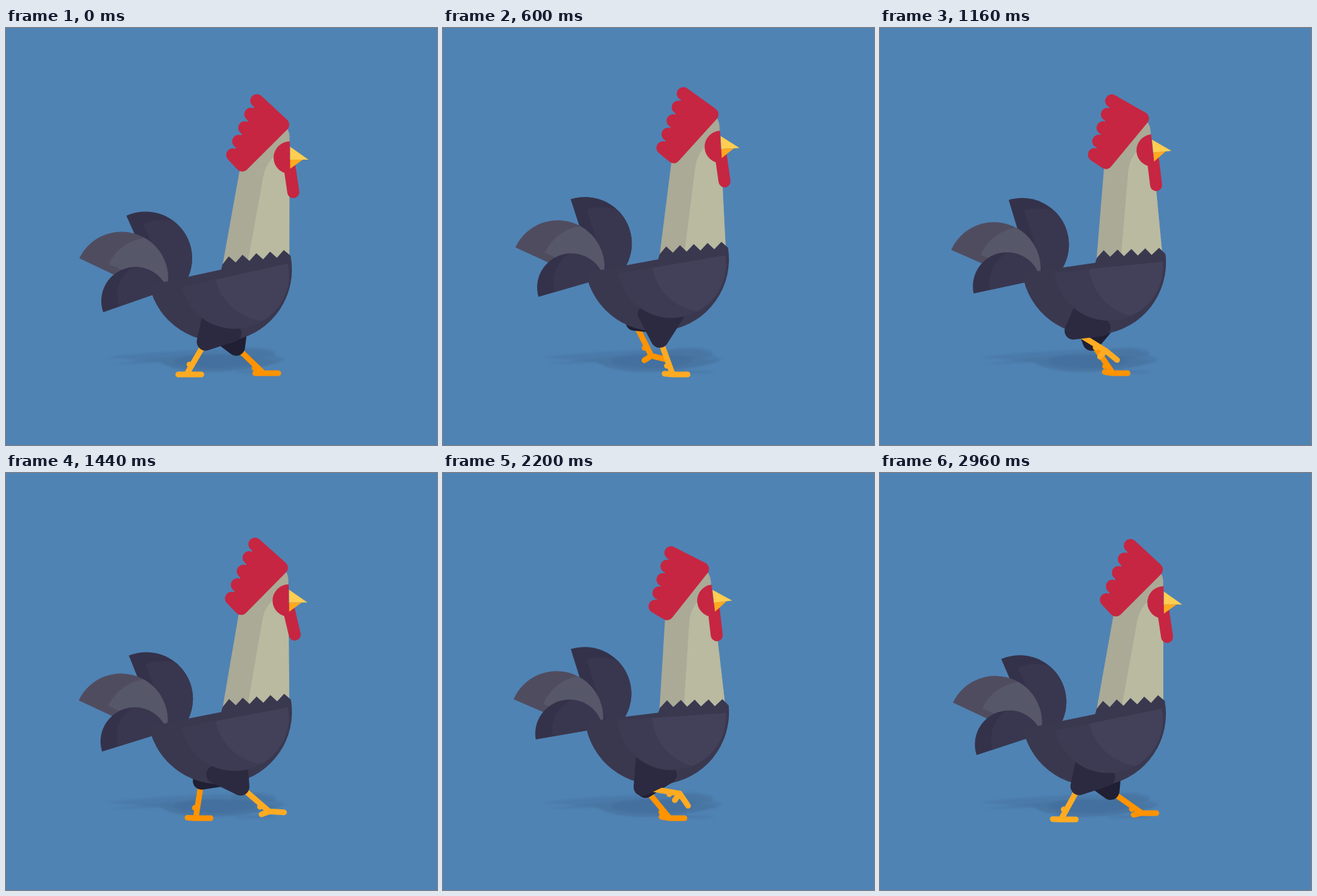
Animation, 683 px wide and 662 px high, one loop 3000 ms. Source, as an HTML page:

```html
<!DOCTYPE html>
<html lang="en">
<head>
<meta charset="utf-8">
<title>Walking rooster</title>
<style>
  html, body { margin: 0; width: 100%; height: 100%; overflow: hidden; background: #4f83b4; }
  svg { display: block; width: 100vw; height: 100vh; }
  .limb { fill: none; stroke-width: 9; stroke-linecap: round; stroke-linejoin: round; }
  .thigh { stroke-width: 28; stroke-linejoin: round; }
  .comb { fill: none; stroke: #c62641; stroke-width: 21; stroke-linecap: round; }
</style>
</head>
<body>
<svg viewBox="0 0 683 662" preserveAspectRatio="xMidYMid slice">
  <defs>
    <filter id="soft" x="-20%" y="-60%" width="140%" height="220%"><feGaussianBlur stdDeviation="1.8"/></filter>
    <clipPath id="bowlClip"><path d="M-86 0A86 85 0 0 0 86 0Z"/></clipPath>
  </defs>
  <rect width="683" height="662" fill="#4f83b4"/>
  <g fill="#3f6791" fill-opacity=".26" filter="url(#soft)">
    <path d="M158 523Q200 517 270 513T400 510Q425 516 443 527Q400 542 340 545T240 530Z"/>
    <path d="M166 534Q200 528 280 520T436 530Q390 544 330 546T245 531Z"/>
    <ellipse cx="330" cy="529" rx="65" ry="11"/>
    <ellipse cx="392" cy="516" rx="36" ry="9"/>
    <ellipse cx="395" cy="546" rx="34" ry="2.5"/>
  </g>
  <g id="farLeg">
    <path class="limb" stroke="#ff9300"/>
    <path class="thigh" fill="#201f33" stroke="#201f33" d="M46 0L7 22.5V-22.5Z"/>
  </g>
  <g id="tail"></g>
  <g id="head">
    <path fill="#aaaa97" d="M341 388L371 220 438 150Q449 160 449 172V392Z"/>
    <path fill="#b9baa0" d="M380 388L407 238Q411 212 430 200L449 190V392Z"/>
    <path id="combFill" fill="#c62641"/>
    <path id="combLobes" class="comb"/>
    <path fill="#c62641" d="M449.5 179.5A25.5 25.5 0 0 0 449.5 231Z"/>
    <path id="wattle" class="comb" style="stroke-width:19" d="M449 219L455 260"/>
    <path fill="#ffce52" d="M450 188L479 208.5H450Z"/>
    <path fill="#ffa91f" d="M450 208.5H470L450 223Z"/>
  </g>
  <path id="body" fill="#3a384f"/>
  <g id="nearLeg">
    <path class="limb" stroke="#ffab22"/>
    <path class="thigh" fill="#2c2a41" stroke="#2c2a41" d="M46 0L7 22.5V-22.5Z"/>
  </g>
  <g id="bowl">
    <path fill="#3d3b53" d="M-86 0A86 85 0 0 0 86 0Z"/>
    <path fill="#434159" clip-path="url(#bowlClip)" d="M-31 0A86 85 0 0 0 141 0Z"/>
  </g>
</svg>
<script>
const STEP = 500, CYCLE = 2 * STEP, LOOP = 3000, TICK = 40;
const THIGH = 46, SHIN = 60, STRIDE = 122, BACK = 286;
const RAD = Math.PI / 180;
const $ = id => document.getElementById(id);
const wave = (t, period, lead = 0) => Math.cos(2 * Math.PI * (t + lead) / period);
const polar = ([x, y], r, deg) => [x + r * Math.cos(deg * RAD), y + r * Math.sin(deg * RAD)];
const heading = ([x, y], [tx, ty]) => Math.atan2(ty - y, tx - x) / RAD;
const turn = (p, center, deg) =>
  polar(center, Math.hypot(p[0] - center[0], p[1] - center[1]), heading(center, p) + deg);
const pt = p => p.map(v => v.toFixed(2)).join(' ');
const place = (el, value) => el.setAttribute('transform', value);
const range = (n, make) => Array.from({ length: n }, (_, i) => make(i));

// First half of the cycle swings the foot forward, second half drags it back on the ground
function footAt(phase, { ground, drag }) {
  const swinging = phase < STEP, u = phase % STEP / STEP;
  const arc = Math.sin(Math.PI * u);
  if (!swinging) return { ankle: [BACK + STRIDE * (1 - u) ** drag, ground], front: 0, back: 180 + 10 * arc };
  const reach = 48 * arc - 9 * Math.sin(2 * Math.PI * u);
  return {
    ankle: [BACK + STRIDE * u + reach, ground - 46 * arc * (1.1 - .4 * u)],
    front: 65 * arc ** 3,
    back: 180 - 56 * arc
  };
}

// Two-bone solution for the thigh, bending backwards at the knee
function thighAngle(hip, ankle) {
  const d = Math.hypot(ankle[0] - hip[0], ankle[1] - hip[1]);
  const cos = (THIGH ** 2 + d ** 2 - SHIN ** 2) / (2 * THIGH * d);
  return heading(hip, ankle) + Math.acos(Math.min(1, cos)) / RAD;
}

function poseLeg(leg, time, hip) {
  const { ankle, front, back } = footAt((time + leg.offset) % CYCLE, leg);
  const angle = thighAngle(hip, ankle);
  const knee = polar(hip, THIGH, angle), shin = heading(knee, ankle);
  const spur = polar(polar(ankle, -16, shin), 4, shin + 90);
  const [limb, thigh] = leg.el.children;
  limb.setAttribute('d', `M${pt(knee)}L${pt(ankle)}L${pt(polar(ankle, 23.5, front))}` +
    `M${pt(ankle)}L${pt(polar(ankle, 13, back))}M${pt(spur)}h.01`);
  place(thigh, `translate(${pt(hip)}) rotate(${angle})`);
}

const legs = [
  { el: $('farLeg'), offset: STEP, ground: 548, drag: 1 },
  { el: $('nearLeg'), offset: 0, ground: 550, drag: 2 }
];

// Half-disc feathers; the lighter copy is offset by `shift`, and each sways around its `root`
const feathers = [
  { center: [221, 365], r: 74, angle: 66, shift: [23, -19], root: [270, 410], dark: '#34324a', light: '#39374f', sway: (tilt, bob) => -.25 * bob },
  { center: [183, 397], r: 74, angle: 25.5, shift: [46, -12], root: [250, 415], dark: '#504c60', light: '#565769', sway: tilt => -.85 * tilt },
  { center: [205, 433], r: 54, angle: -19.3, shift: [27, 0], root: [256, 415], dark: '#34324a', light: '#39374f', sway: tilt => .45 * tilt }
];
$('tail').innerHTML = feathers.map(({ center, r, angle, shift, dark, light }, i) => {
  const half = `M${-r} 0A${r} ${r} 0 0 1 ${r} 0Z`;
  return `<g><g transform="translate(${center}) rotate(${angle})">
    <clipPath id="feather${i}"><path d="${half}"/></clipPath>
    <path fill="${dark}" d="${half}"/>
    <g clip-path="url(#feather${i})"><path fill="${light}" transform="translate(${shift})" d="${half}"/></g>
  </g></g>`;
}).join('');

const collar = range(9, i => [353 + 10.9 * i, 362 - 1.25 * i + (i % 2) * 11]);
$('body').setAttribute('d',
  `M451 361A114.45 114.45 0 0 1 227 408L341 383 343 375 ${collar.map(pt).join(' ')}Z`);

const lobes = range(5, i => [397 - 9.5 * i, 115 + 21.5 * i]);
const bases = range(5, i => [438 - 16 * i, 153 + 16 * i]);

function poseHead(t, lean, drop) {
  place($('head'), `translate(0 ${drop}) rotate(${lean} 395 385)`);
  const ends = lobes.map((p, i) => turn(p, bases[i], 1.4 * lean));
  $('combLobes').setAttribute('d',
    ends.map((p, i) => `M${pt(p)}L${bases[i]}`).join('') + `M${bases[0]}L${bases[4]}`);
  $('combFill').setAttribute('d', `M${ends.map(pt).join('L')}L${bases[4]}L${bases[0]}Z`);
  const flick = -6.5 * Math.max(0, wave(t, CYCLE, -STEP + 20)) ** 8;
  place($('wattle'), `rotate(${flick - 1.25 * lean} 449 215)`);
}

function render(time) {
  const t = time % CYCLE;
  const tilt = 5.2 * (1 - wave(t, STEP, -10));
  const bob = -9.2 + 8.3 * wave(t, STEP / 2, 16) + 2 * wave(t, STEP);
  const lean = -3.4 + 3.55 * wave(t, STEP, 14);
  const drop = bob + .3 * tilt, roll = .6 * tilt;

  const bodyPose = `translate(0 ${drop}) rotate(${roll} 339 384)`;
  place($('body'), bodyPose);
  place($('tail'), bodyPose);
  feathers.forEach(({ root, sway }, i) =>
    place($('tail').children[i], `rotate(${sway(tilt, bob)} ${root})`));
  place($('bowl'), `translate(362.5 ${392 + bob}) rotate(${tilt - 12.7})`);
  poseHead(t, lean, drop + 56 * Math.sin(roll * RAD));

  const hip = [347 - .55 * tilt, 463.5 + drop];
  legs.forEach(leg => poseLeg(leg, t, hip));
}

let start;
function frame(now) {
  start ??= now;
  render(Math.floor((now - start) % LOOP / TICK) * TICK);
  requestAnimationFrame(frame);
}
render(0);
requestAnimationFrame(frame);
</script>
</body>
</html>
```
